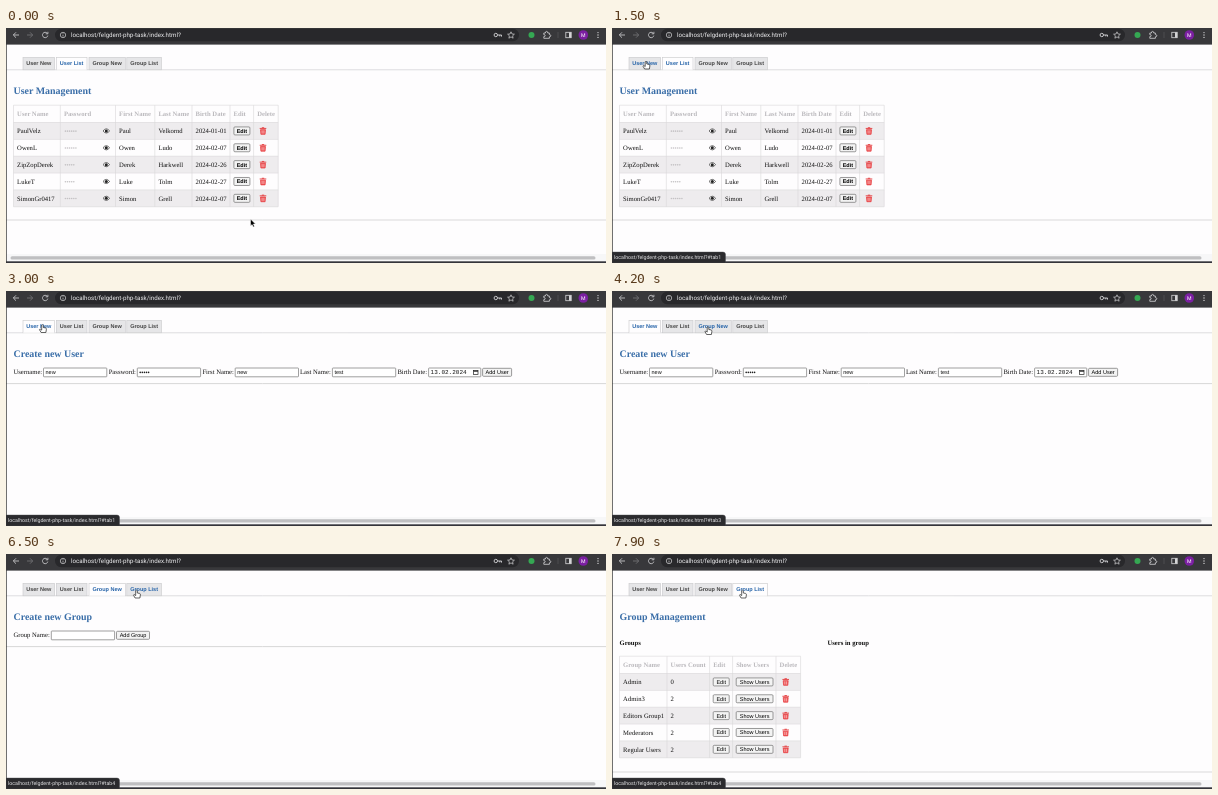
Animation, 600 px wide and 235 px high, one loop 8 s. Source, as an HTML page:

```html
<!DOCTYPE html>
<html lang="en">
<head>
<meta charset="utf-8">
<title>User and group admin</title>
<style>
  html, body { margin: 0; width: 100%; height: 100%; overflow: hidden; background: #fff; }
  svg { display: block; width: 100%; height: 100%; text-rendering: geometricPrecision; }
  text { white-space: pre; }
  .serif { font-family: "Liberation Serif", serif; font-size: 6.63px; }
  .sans { font-family: "Liberation Sans", sans-serif; font-size: 5.52px; }
  .mono { font-family: "Liberation Mono", monospace; font-size: 6px; }
  .ui { font-family: Roboto, sans-serif; font-size: 6.18px; }
  .bold { font-weight: bold; }
  .title { font-size: 9.94px; font-weight: bold; }
</style>
</head>
<body>
<svg id="stage" viewBox="0 0 600 235"></svg>
<script>
const LOOP = 8000, STEP = 100, FADE = 800;
const BLUE = '#3a6ea8', LINK = '#2563a8';
const ADDRESS = 'localhost/felgdent-php-task/index.html?';

const tabs = [
  { label: 'User New', x: 17, w: 31.6 },
  { label: 'User List', x: 50.3, w: 30.7 },
  { label: 'Group New', x: 83, w: 36.3 },
  { label: 'Group List', x: 120.8, w: 34.6 },
];
const switches = [
  { at: 0, tab: 1, fade: -FADE },
  { at: 2000, tab: 0, fade: 2030 },
  { at: 4900, tab: 2, fade: 4850 },
  { at: 7000, tab: 3, fade: 7080 },
];
const pointerPath = [
  [0, 244.5, 191], [900, 62, 50], [1500, 34, 33], [2800, 34, 33], [2900, 36, 33.5],
  [3000, 36.5, 33.5], [3700, 66, 35], [4200, 96, 35.5], [5300, 96, 35.5],
  [5400, 96, 34.5], [5700, 96, 34.5], [6500, 130.5, 36],
];

const text = (x, y, str, cls = 'serif', fill = '#111', extra = '') =>
  `<text x="${x}" y="${y}" class="${cls}" fill="${fill}" ${extra}>${str}</text>`;
const rect = (x, y, w, h, fill, extra = '') =>
  `<rect x="${x}" y="${y}" width="${w}" height="${h}" fill="${fill}" ${extra}/>`;
const path = (d, stroke, width = 0.8, fill = 'none') =>
  `<path d="${d}" stroke="${stroke}" stroke-width="${width}" fill="${fill}"/>`;
const circle = (x, y, r, fill, extra = '') =>
  `<circle cx="${x}" cy="${y}" r="${r}" fill="${fill}" ${extra}/>`;
const at = (x, y, body) => `<g transform="translate(${x} ${y})">${body}</g>`;

const rule = y => path(`M0 ${y}H600`, '#c9c9c9', 0.7);
const title = str => text(7.5, 66.2, str, 'serif title', BLUE);
const field = (x, w, value = '', cls = 'sans') =>
  rect(x, 77, w, 8.8, '#fff', 'stroke="#777" stroke-width=".7" rx=".6"') +
  text(x + 2, 83.2, value, cls);
const button = (x, y, w, label, cls = 'sans') =>
  rect(x, y, w, 8, '#f3f3f3', 'stroke="#707070" stroke-width=".7" rx="1"') +
  text(x + w / 2, y + 5.9, label, cls, '#000', 'text-anchor="middle"');
const dots = (x, y, n, color) =>
  Array.from({ length: n }, (_, i) => circle(x + i * 2.1, y, 0.8, color)).join('');
const eye = (x, y) => at(x, y,
  path('M-3.3 0Q0-4.2 3.3 0Q0 4.2-3.3 0Z', '#333', 0.7, '#fff') + circle(0, 0, 1.5, '#222'));
const trash = (x, y) => at(x, y,
  path('M-3.3-2.5H3.3M-1.2-3.2H1.2', '#e5393c', 0.9) +
  path('M-2.5-1.3H2.5L2.1 3.4H-2.1Z', '#e5393c', 0.7, '#ee5a5c') +
  path('M-.9-.5V2.6M.9-.5V2.6', '#fff', 0.45));

// cols holds the column edges; cell(row, col, x, midY) draws one body cell
function table(cols, top, heads, rows, cell) {
  const headH = 17.3, rowH = 16.85, left = cols[0], right = cols.at(-1);
  const bottom = top + headH + rows.length * rowH;
  let out = '', lines = `M${left} ${top}H${right}`;
  rows.forEach((row, r) => {
    const y = top + headH + r * rowH;
    if (r % 2 === 0) out += rect(left, y, right - left, rowH, '#eeecee');
    lines += `M${left} ${y}H${right}`;
    heads.forEach((_, c) => out += cell(row, c, cols[c] + 3.6, y + rowH / 2));
  });
  heads.forEach((h, c) => out += text(cols[c] + 3.6, top + 10.9, h, 'serif bold', '#bbb9bd'));
  cols.forEach(x => lines += `M${x} ${top}V${bottom}`);
  return out + path(lines + `M${left} ${bottom}H${right}`, '#d9d7d9', 0.6);
}

const users = [
  ['PaulVelz', 'Paul', 'Velkornd', '2024-01-01', 6],
  ['OwenL', 'Owen', 'Ludo', '2024-02-07', 6],
  ['ZipZopDerek', 'Derek', 'Harkwell', '2024-02-26', 5],
  ['LukeT', 'Luke', 'Tolm', '2024-02-27', 5],
  ['SimonGr0417', 'Simon', 'Grell', '2024-02-07', 6],
];
const groups = [['Admin', 0], ['Admin3', 2], ['Editors Group1', 2], ['Mederators', 2], ['Regular Users', 2]];

const userCell = ([login, first, last, born, secret], c, x, y) => [
  () => text(x, y + 2.2, login),
  () => dots(x + 1.5, y + 0.2, secret, '#c4c2c4') + eye(100.3, y),
  () => text(x, y + 2.2, first),
  () => text(x, y + 2.2, last),
  () => text(x, y + 2.2, born),
  () => button(x + 0.3, y - 4, 16, 'Edit', 'sans bold'),
  () => trash(257, y),
][c]();
const groupCell = ([name, count], c, x, y) => [
  () => text(x, y + 2.2, name),
  () => text(x, y + 2.2, count),
  () => button(x, y - 4, 16, 'Edit'),
  () => button(x, y - 4, 36.8, 'Show Users'),
  () => trash(173.7, y),
][c]();

const panels = [
  title('Create new User') +
    text(7.5, 83.2, 'Username:') + field(37.5, 63.3, 'new') +
    text(102.7, 83.2, 'Password:') + field(131.3, 63.3) + dots(134.2, 81.4, 5, '#222') +
    text(196.4, 83.2, 'First Name:') + field(229.2, 63.3, 'new') +
    text(294, 83.2, 'Last Name:') + field(326.4, 63.3, 'test') +
    text(391.4, 83.2, 'Birth Date:') + field(422.6, 52.2, '13.02.2024', 'mono') +
    rect(467.6, 79.4, 4.4, 4.2, 'none', 'stroke="#222" stroke-width=".7"') +
    path('M467.6 80.2H472', '#222', 1) +
    button(476.6, 77.3, 29, 'Add User') + rule(92.6),
  title('User Management') +
    table([7.5, 54.3, 109.5, 148.8, 186, 224, 247.6, 272.2], 77.2,
      ['User Name', 'Password', 'First Name', 'Last Name', 'Birth Date', 'Edit', 'Delete'],
      users, userCell) + rule(192),
  title('Create new Group') +
    text(7.5, 83.2, 'Group Name:') + field(45.3, 63.3) +
    button(110.5, 77.3, 33, 'Add Group') + rule(92.6),
  title('Group Management') +
    text(7.5, 91.3, 'Groups', 'serif bold') + text(215.5, 91.3, 'Users in group', 'serif bold') +
    table([7.5, 55, 97.6, 120.6, 164, 188.6], 102.2,
      ['Group Name', 'Users Count', 'Edit', 'Show Users', 'Delete'],
      groups, groupCell) + rule(218),
];

const ICON = '#d4d4d6';
const toolbar =
  rect(0, 0, 600, 16.6, '#38383b') +
  rect(49, 0.8, 464, 12.4, '#28282b', 'rx="6.2"') +
  path('M13 7H7.5M10 4.3L7.3 7L10 9.7', ICON) +
  path('M21 7H26.5M24 4.3L26.7 7L24 9.7', '#77777a') +
  path('M41.2 5.2A2.7 2.7 0 1 0 41.8 7.6M41.9 3.8V5.8H39.7', ICON) +
  circle(57, 7, 2.7, 'none', `stroke="${ICON}" stroke-width=".7"`) +
  path('M57 6.6V8.6M57 5.2V5.9', ICON, 0.7) +
  text(65, 9.2, ADDRESS, 'ui', '#ececee') +
  circle(489.8, 7, 1.7, 'none', `stroke="${ICON}" stroke-width=".9"`) +
  path('M491.5 7H495.5V8.6M493.8 7V8.4', ICON, 0.9) +
  path('M505 3.8L506 6L508.4 6.2L506.6 7.8L507.1 10.2L505 8.9L502.9 10.2L503.4 7.8L501.6 6.2L504 6Z', ICON, 0.7) +
  circle(525.5, 7, 3, '#35a853') +
  path('M537.8 5H539.4Q539.4 3.4 540.6 3.4T541.8 5H543.4V6.6Q544.8 6.6 544.8 7.7T543.4 8.8V10.3H537.8V8.6Q539.2 8.6 539.2 7.6T537.8 6.6Z', ICON) +
  path('M552 4V10', '#5b5b5f', 0.6) +
  rect(559.8, 4.3, 5.4, 5.4, 'none', `stroke="${ICON}" stroke-width=".8"`) +
  rect(563, 4.3, 2.2, 5.4, ICON) +
  circle(577.3, 7, 4.8, '#7b1fa2') +
  text(577.3, 8.9, 'M', 'ui', '#fff', 'text-anchor="middle" style="font-size:5.2px"') +
  [4.6, 7, 9.4].map(y => circle(592, y, 0.7, ICON)).join('');

const frame =
  rect(0, 226, 600, 7.4, '#f7f7f8') + rect(4.5, 228.3, 585, 3.2, '#bfbfc1', 'rx="1.6"') +
  rect(0, 233.3, 600, 1.7, '#34343a') + rect(0, 16, 0.7, 219, '#333');

const arrow = path('M0 0V7L1.6 5.6L2.7 8L3.9 7.5L2.9 5.1H5Z', '#fff', 0.5, '#000');
const hand = path('M-.8.8Q0-.5.8.8V3L3 3.4Q4 3.7 3.9 4.8L3.4 8H-1.4L-3 5.2Q-2.8 4.2-1.8 4.8L-.8 5.6Z', '#222', 0.7, '#fff');

document.getElementById('stage').innerHTML =
  rect(0, 0, 600, 235, '#fefdfe') + path('M0 41.8H600', '#cfcfd1', 0.7) +
  tabs.map(t => `<g class="tab">${rect(t.x, 29.4, t.w, 12.4, '#e6e6e8', 'stroke="#c9c9cb" stroke-width=".6"')}` +
    path(`M${t.x + 0.3} 41.8h${t.w - 0.6}`, '#fefdfe', 1) +
    text(t.x + t.w / 2, 37.4, t.label, 'sans bold', '#444', 'text-anchor="middle"') + '</g>').join('') +
  panels.map(p => `<g class="panel">${p}</g>`).join('') +
  toolbar + frame +
  `<g id="status">${path('M0 224H111Q113.5 224 113.5 226.5V235H0Z', '#4a4a4e', 0.4, '#2b2b2e')}` +
    text(2, 230.7, '', 'ui', '#e4e4e6', 'style="font-size:5.25px"') + '</g>' +
  `<g id="arrow">${arrow}</g><g id="hand">${hand}</g>`;

const $ = id => document.getElementById(id);
const tabNodes = document.querySelectorAll('.tab');
const panelNodes = document.querySelectorAll('.panel');
const statusText = $('status').querySelector('text');
const show = (node, on) => node.setAttribute('display', on ? 'inline' : 'none');
const clamp = v => Math.min(1, Math.max(0, v));
const swing = v => 0.5 - Math.cos(Math.PI * clamp(v)) / 2;

function pointerAt(t) {
  const i = pointerPath.findLastIndex(k => k[0] <= t);
  const [t0, x0, y0] = pointerPath[i];
  const [t1, x1, y1] = pointerPath[i + 1] || [LOOP, x0, y0];
  const k = swing((t - t0) / (t1 - t0));
  return [x0 + (x1 - x0) * k, y0 + (y1 - y0) * k];
}

function draw(t) {
  const current = switches.findLast(s => s.at <= t);
  const [x, y] = pointerAt(t);
  const hover = y < 42 ? tabs.findLastIndex(tab => tab.x <= x) : -1;

  tabNodes.forEach((node, i) => {
    const active = i === current.tab;
    node.children[0].setAttribute('fill', active ? '#fefdfe' : '#e6e6e8');
    show(node.children[1], active);
    node.children[2].setAttribute('fill', active || i === hover ? LINK : '#444');
  });
  panelNodes.forEach((node, i) => {
    show(node, i === current.tab);
    node.setAttribute('opacity', swing((t - current.fade) / FADE));
  });

  show($('status'), hover >= 0);
  statusText.textContent = `${ADDRESS}#tab${hover + 1}`;
  show($('arrow'), hover < 0);
  show($('hand'), hover >= 0);
  for (const id of ['arrow', 'hand']) $(id).setAttribute('transform', `translate(${x} ${y})`);
}

const start = performance.now();
function tick() {
  const t = (performance.now() - start) % LOOP;
  draw(Math.floor(t / STEP) * STEP);
  requestAnimationFrame(tick);
}
tick();
</script>
</body>
</html>
```
